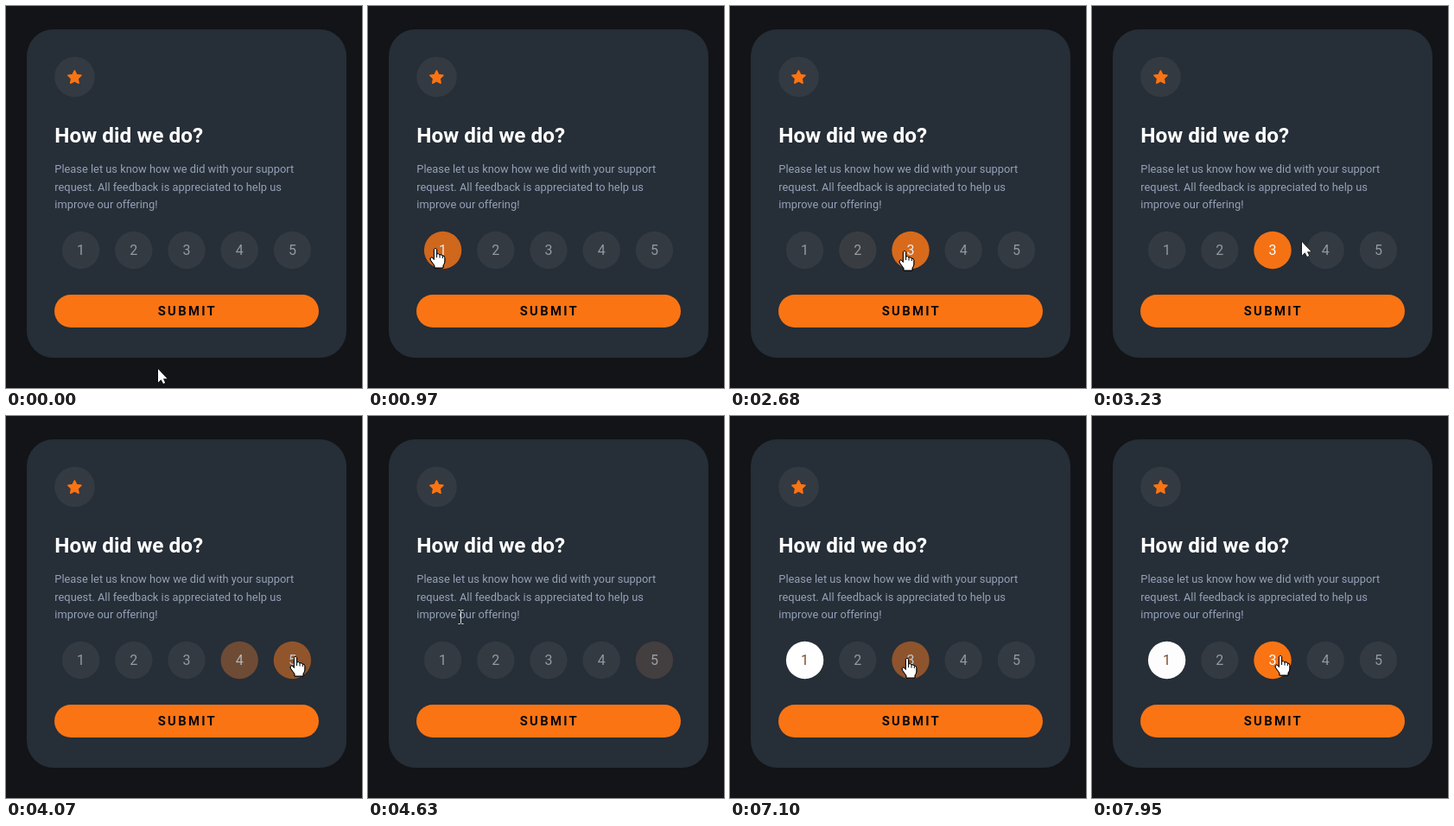
These frames come from a looping animation (412 px wide and 442 px high, 8000 ms). An HTML page with a canvas:

```html
<!DOCTYPE html>
<html lang="en">
<head>
<meta charset="utf-8">
<title>Rating card</title>
<style>
  html, body { margin: 0; width: 100%; height: 100%; overflow: hidden; background: #121417; }
  canvas { display: block; }
</style>
</head>
<body>
<canvas id="stage" width="412" height="442"></canvas>
<script>
const ctx = document.getElementById('stage').getContext('2d');
const LOOP = 8000, STEP = 69.13, FADE = 500;
const FONT = 'Roboto, "Open Sans", sans-serif';
const ORANGE = '#fb7413';
const RADIUS = 21.7, ROW_Y = 282.5;
const centers = Array.from({ length: 5 }, (_, i) => 86.6 + 61.2 * i);

// Each look is the disc colour followed by the digit colour.
const looks = {
  idle:  [52, 58, 66, 148, 154, 163],
  hover: [251, 116, 19, 255, 255, 255],
  focus: [255, 255, 255, 125, 74, 44]
};
const clicks = [5700, 7940];

// Turning points of the pointer: time, x, y
const path = [
  [0, 176, 420], [400, -6, 372], [800, 76, 286], [1245, 79, 276], [1797, 79, 276],
  [2143, 138, 282], [2460, 190, 284], [3215, 226, 275], [3249, 243, 273],
  [3760, 272, 281], [4079, 335, 278], [4250, 341, 265], [4632, 107, 232],
  [4830, 82, 244], [5020, 83, 276], [5600, 90, 270], [6291, 90, 270],
  [6360, 113, 266], [6780, 168, 237], [7110, 205, 280], [7950, 218, 277]
];

// Monotone cubic interpolation, so the pointer never overshoots a stop.
function slope(i, axis) {
  const rate = j => (path[j + 1][axis] - path[j][axis]) / (path[j + 1][0] - path[j][0]);
  if (i === 0 || i === path.length - 1) return 0;
  const a = rate(i - 1), b = rate(i);
  return a * b > 0 ? 2 * a * b / (a + b) : 0;
}

function pointerAt(t) {
  const end = path[path.length - 1];
  if (t >= end[0]) return end.slice(1);
  const i = path.findIndex(p => p[0] > t) - 1;
  const span = path[i + 1][0] - path[i][0], s = (t - path[i][0]) / span;
  return [1, 2].map(axis =>
    (1 + 2 * s) * (1 - s) ** 2 * path[i][axis] + s * s * (3 - 2 * s) * path[i + 1][axis] +
    span * s * (1 - s) * ((1 - s) * slope(i, axis) - s * slope(i + 1, axis)));
}

const discUnder = (x, y) => centers.findIndex(cx => Math.hypot(x - cx, y - ROW_Y) < RADIUS);

// Hover follows the pointer, focus follows the last click.
function stateOf(disc, t) {
  if (discUnder(...pointerAt(t)) === disc) return 'hover';
  const click = clicks.filter(c => c <= t).pop();
  return click && discUnder(...pointerAt(click)) === disc ? 'focus' : 'idle';
}

const changes = centers.map((_, disc) => {
  const list = [{ time: -FADE, state: 'idle' }];
  for (let time = 0; time < LOOP; time += 5) {
    const state = stateOf(disc, time);
    if (state !== list[list.length - 1].state) list.push({ time, state });
  }
  return list;
});

// The CSS "ease" curve.
function ease(p) {
  if (p >= 1) return 1;
  const bezier = (a, b, s) => 3 * a * s * (1 - s) ** 2 + 3 * b * s * s * (1 - s) + s ** 3;
  let lo = 0, hi = 1;
  for (let i = 0; i < 20; i++) {
    const mid = (lo + hi) / 2;
    if (bezier(0.25, 0.25, mid) < p) lo = mid; else hi = mid;
  }
  return bezier(0.1, 1, lo);
}

function lookAt(list, t) {
  let from = looks.idle, to = looks.idle, start = -FADE;
  const mix = time => {
    const k = ease((time - start) / FADE);
    return from.map((v, i) => v + (to[i] - v) * k);
  };
  for (const { time, state } of list) {
    if (time > t) break;
    from = mix(time);
    to = looks[state];
    start = time;
  }
  return mix(t);
}

function disc(x, y, r, color) {
  ctx.fillStyle = color;
  ctx.beginPath();
  ctx.arc(x, y, r, 0, Math.PI * 2);
  ctx.fill();
}

function box(x, y, w, h, r, color) {
  ctx.fillStyle = color;
  ctx.beginPath();
  ctx.roundRect(x, y, w, h, r);
  ctx.fill();
}

function label(text, x, y, font, color, align = 'left', spacing = 0) {
  ctx.font = `${font} ${FONT}`;
  ctx.letterSpacing = spacing + 'px';
  ctx.textAlign = align;
  ctx.fillStyle = color;
  ctx.fillText(text, x, y);
}

function star(x, y) {
  ctx.beginPath();
  for (let i = 0; i < 10; i++) {
    const r = i % 2 ? 4 : 8, a = (i / 5 - 0.5) * Math.PI;
    ctx.lineTo(x + r * Math.cos(a), y + r * Math.sin(a));
  }
  ctx.closePath();
  ctx.fillStyle = ctx.strokeStyle = ORANGE;
  ctx.lineWidth = 1.5;
  ctx.lineJoin = 'round';
  ctx.fill();
  ctx.stroke();
}

const arrow = new Path2D('M0 0V15.4L3.5 12.2L6 17L8.2 16L6 11.2H10.6Z');
const hand = new Path2D('M-1.6 1.5Q0 -1 1.6 1.5V7Q4 5.8 5 8Q7.4 7 8.3 9.2Q10.8 8.7 10.8 11.5' +
  'V16Q10.5 18.5 9 20V23H-1V20.5L-5.6 14Q-6.6 11.5 -4.6 11Q-3.2 10.8 -1.6 13.5Z');
const knuckles = new Path2D('M1.6 7V11M5 8V11.5M8.3 9.2V12');
const beam = new Path2D('M-3 -8H-1L0 -7L1 -8H3M0 -7V7M-3 8H-1L0 7L1 8H3');

function drawPointer(x, y) {
  const overDisc = discUnder(x, y) >= 0;
  const overText = y > 182 && y < 240 && x > 56 && x < 178;
  ctx.save();
  ctx.translate(Math.round(x), Math.round(y));
  ctx.lineJoin = 'round';
  ctx.lineWidth = 1;
  if (overText) {
    ctx.translate(0.5, 0.5);
    ctx.strokeStyle = '#dfe2e6';
    ctx.stroke(beam);
  } else {
    const shape = overDisc ? hand : arrow;
    ctx.fillStyle = '#fff';
    ctx.strokeStyle = '#000';
    ctx.stroke(shape);
    ctx.fill(shape);
    if (overDisc) {
      ctx.stroke(shape);
      ctx.stroke(knuckles);
    }
  }
  ctx.restore();
}

function draw(t) {
  ctx.fillStyle = '#121417';
  ctx.fillRect(0, 0, 412, 442);
  box(24, 27, 370, 380, 31, '#262e37');
  disc(79.5, 82, 23.3, '#343a42');
  star(79.4, 82.8);

  label('How did we do?', 56.3, 158, 'bold 24.4px', '#fff');
  ['Please let us know how we did with your support',
   'request. All feedback is appreciated to help us',
   'improve our offering!'].forEach((line, i) =>
    label(line, 56.3, 193 + 20.5 * i, '12.85px', '#95a1b8'));

  centers.forEach((x, i) => {
    const c = lookAt(changes[i], t);
    disc(x, ROW_Y, RADIUS, `rgb(${c.slice(0, 3)})`);
    label(i + 1, x, 287.5, '16px', `rgb(${c.slice(3)})`, 'center');
  });

  box(56, 334, 306, 38, 19, ORANGE);
  label('SUBMIT', 175.7, 358, 'bold 14.8px', '#08090b', 'left', 2.3);
  drawPointer(...pointerAt(t));
}

// The picture is renewed about fourteen times a second, as in a screen recording.
function tick() {
  const t = performance.now() % LOOP;
  draw(Math.min(Math.floor((t + 24) / STEP), 115) * STEP);
  requestAnimationFrame(tick);
}
tick();
</script>
</body>
</html>
```
